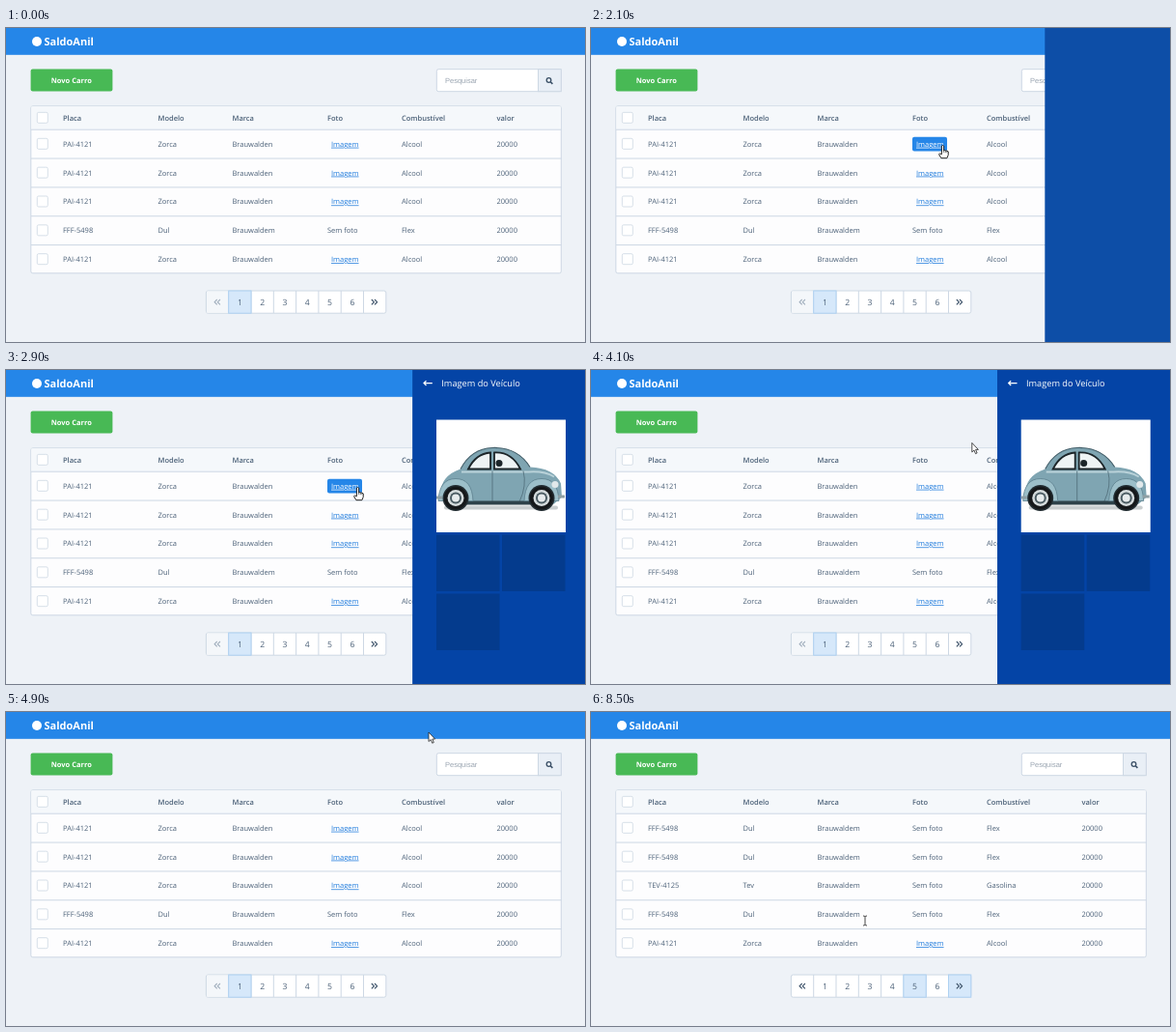
These frames come from a looping animation (600 px wide and 325 px high, 8600 ms). An HTML page:

```html
<!DOCTYPE html>
<html lang="pt-BR">
<head>
<meta charset="utf-8">
<title>Carros</title>
<style>
  html, body { margin: 0; width: 100%; height: 100%; overflow: hidden; background: #eef2f7; }
  svg { display: block; font: 7.5px "Open Sans", sans-serif; text-rendering: geometricPrecision; }
</style>
</head>
<body>
<svg id="stage" width="600" height="325" viewBox="0 0 600 325"></svg>
<script>
const stage = document.getElementById('stage');
const LOOP = 8600, STEP = 100;
const INK = '#4c6178', LINE = '#cdd8e4', BLUE = '#2586e8';

const clamp = v => Math.max(0, Math.min(1, v));
const ramp = (t, from, to) => clamp((t - from) / (to - from));
const smooth = u => u * u * (3 - 2 * u);

const rect = (x, y, w, h, fill, extra = '') =>
  `<rect x="${x}" y="${y}" width="${w}" height="${h}" fill="${fill}" ${extra}/>`;
const text = (x, y, s, fill = INK, extra = '') =>
  `<text x="${x}" y="${y}" fill="${fill}" ${extra}>${s}</text>`;
const path = (d, fill, stroke = 'none', width = 1) =>
  `<path d="${d}" fill="${fill}" stroke="${stroke}" stroke-width="${width}"/>`;
const circle = (x, y, r, fill, extra = '') => `<circle cx="${x}" cy="${y}" r="${r}" fill="${fill}" ${extra}/>`;
const group = (x, y, body) => `<g transform="translate(${x} ${y})">${body}</g>`;

// Table
const columns = [59, 157.5, 234.5, 333, 410, 508.5];
const titles = ['Placa', 'Modelo', 'Marca', 'Foto', 'Combustível', 'valor'];
const cars = {
  P: ['PAI-4121', 'Zorca', 'Brauwalden', '', 'Alcool', '20000'],
  F: ['FFF-5498', 'Dul', 'Brauwaldem', 'Sem foto', 'Flex', '20000'],
  X: ['TEV-4125', 'Tev', 'Brauwaldem', 'Sem foto', 'Gasolina', '20000']
};
const pages = ['PPPFP', 'PXPFX', 'FPXPX', 'FPXXF', 'FFXFP'];
const clicks = [6300, 6800, 7500, 8100];

const checkbox = y => rect(32.3, y - 5.7, 11, 11, '#fff', 'rx="1.5" stroke="#d6dfe8"');
const link = (y, fill) => text(337, y + 2.7, 'Imagem', fill, 'text-decoration="underline"');

function table(page, hover) {
  let s = rect(25.8, 80.8, 549.5, 173, '#fdfdfe', `rx="2" stroke="${LINE}"`)
    + rect(26.3, 81.3, 548.5, 23.7, '#f5f8fb') + checkbox(93);
  titles.forEach((name, i) => s += text(columns[i], 95.7, name, INK, 'font-weight="600"'));
  [...page].forEach((key, r) => {
    const y = 120 + r * 29.85;
    s += rect(26, y - 15.3, 549.5, 1, LINE) + checkbox(y);
    cars[key].forEach((value, i) => s += text(columns[i], y + 2.7, value));
    if (key === 'P') s += link(y, '#1f7bdc');
  });
  if (hover) s += `<g opacity="${hover}">${rect(333, 112.7, 36, 14.8, BLUE, 'rx="2"')}${link(120, '#fff')}</g>`;
  return s;
}

// Page buttons
function chevrons(x, dir, color) {
  const one = dx => `M${x + dx - 1.3 * dir} 281l${2.6 * dir} 2.7l${-2.6 * dir} 2.7`;
  return path(one(-1.6) + one(1.6), 'none', color, 1.15);
}

function pager(t, current) {
  const fade = current ? ramp(t, clicks[current - 1] - 100, clicks[current - 1] + 200) : 1;
  const hover = ramp(t, 5800, 6100), w = 23.3;
  const left = i => 207.4 + i * w;
  let s = rect(207.4, 272, 8 * w, 23.2, '#fff', `rx="2" stroke="${LINE}"`), lit = '';
  if (!current) s += rect(208, 272.5, w - .5, 22.2, '#f4f7fa');
  for (let i = 1; i < 8; i++) s += rect(left(i) - .5, 272, 1, 23, LINE);
  for (let i = 1; i < 8; i++) {
    const on = i === 7 ? hover : i === current + 1 ? fade : i === current ? 1 - fade : 0;
    if (on) lit += rect(left(i), 272, w, 23.2, '#d6e8fa', `stroke="#aed1f2" opacity="${on}"`);
  }
  s += lit;
  for (let i = 1; i < 7; i++)
    s += text(left(i) + w / 2, 286.7, i, INK, 'font-size="8.6" text-anchor="middle"');
  return s + chevrons(219, -1, current ? '#3f546b' : '#a3b0be') + chevrons(381.7, 1, '#3f546b');
}

function screen(t) {
  const current = clicks.filter(c => t >= c).length;
  const hover = ramp(t, 1400, 1700) * (1 - ramp(t, 2900, 3200));
  return rect(0, 0, 600, 325, '#eef2f7') + rect(0, 0, 600, 27.8, BLUE)
    + circle(32, 14, 5, '#fff')
    + text(39.5, 17.6, 'SaldoAnil', '#fff', 'font-size="11" font-weight="700"')
    + rect(25.6, 42.4, 84.8, 23.2, '#48b955', 'rx="2"')
    + text(67.8, 56.7, 'Novo Carro', '#fff', 'font-weight="700" text-anchor="middle"')
    + rect(446.3, 42.7, 129, 23, '#fff', `rx="2" stroke="${LINE}"`)
    + rect(551.5, 42.7, 23.8, 23, '#e9eff6', `stroke="${LINE}"`)
    + text(455, 56.8, 'Pesquisar', '#9aa5b1', 'font-family="Liberation Sans, sans-serif"')
    + circle(562.5, 54, 2.3, 'none', 'stroke="#3a4f66" stroke-width="1.3"')
    + path('M564.2 55.7l2.2 2.2', 'none', '#3a4f66', 1.6)
    + table(pages[current], hover) + pager(t, current);
}

// Side drawer
const wheel = x => circle(x, 81, 12, '#16191b') + circle(x, 81, 8.5, '#d5dcdd')
  + circle(x, 81, 6, '#4a5b62') + circle(x, 81, 4, '#e6ebec');
const fender = x => path(`M${x - 18} 84Q${x - 17} 61 ${x} 61Q${x + 17} 61 ${x + 18} 84Z`, '#9cbfc9', '#5d818e', .8)
  + circle(x, 81, 13.5, '#222d32');

const photo = rect(0, 0, 134, 116.5, '#fff')
  + rect(8, 89, 118, 4, '#c9cecf', 'rx="2"')
  + path('M4 78Q4 58 25 51Q36 30 58 29Q84 28 97 49Q122 50 129 66L130 80L122 87H10Z', '#7fa5b2')
  + path('M25 51Q36 30 58 29Q84 28 97 49', 'none', '#45606b', 1.2)
  + path('M33 51Q41 35 56 34V51ZM60 34Q78 33 87 51H60Z', '#eef3f4', '#1c2529', 1.8)
  + circle(65, 45, 3.5, '#1c2529')
  + path('M26 54H96Q112 53 122 59', 'none', '#b9d2d9', 2)
  + path('M58 53V85M90 53Q94 68 86 85', 'none', '#55737f', .9)
  + rect(30, 84, 68, 4, '#2e424a') + fender(20) + fender(109)
  + rect(0, 79, 6, 3, '#8f9fa4') + rect(126, 78, 7, 3, '#8f9fa4')
  + circle(123, 67, 3.5, '#e1e9eb') + wheel(20) + wheel(109);

const thumb = (x, y) => rect(x, y, 65.5, 58.5, '#043b8d');
const panel = rect(0, 0, 180, 325, '#0444a6')
  + path('M20.3 13.6H11.5M14 11.2L11.5 13.6L14 16', 'none', '#fff', 1.25)
  + text(29.8, 16.8, 'Imagem do Veículo', '#fff', 'font-size="9.2" font-weight="500"')
  + group(24.5, 51.5, photo) + thumb(24.5, 170.5) + thumb(92.5, 170.5) + thumb(24.5, 231.5);

function drawer(t) {
  if (t < 2000 || t >= 4900) return '';
  const closing = t > 4000;
  const slideIn = (start, tau) => 179 * Math.exp(-Math.max(0, t - start) / tau);
  const slideOut = start => 179 * ramp(t, start, start + 500) ** 2;
  const back = 421.2 + (closing ? slideOut(4390) : slideIn(1950, 116));
  const front = 421.2 + (closing ? slideOut(4325) : slideIn(2200, 110));
  return rect(back, 0, 179, 325, closing ? '#053c90' : '#0d4ea7')
    + group(Math.max(front, back), 0, panel);
}

// Pointer
const shapes = {
  arrow: path('M0 0V9.5L2.2 7.6L3.7 11.2L5.3 10.5L3.8 7H6.6Z', '#fff', '#222', .8),
  hand: '<g transform="scale(1.1)">'
    + path('M-1 .5Q0 -.6 1 .5V5L2 4.6L3 5L4 5.1L5.2 5.8V9L4 12H-1.5L-3.6 8.3Q-3 7-1 8.4Z', '#fff', '#222', .9)
    + path('M1 5V7M2.6 5V7M4 5.3V7', 'none', '#222', .5) + '</g>',
  beam: path('M-2 -5Q0 -5 0 -4Q0 -5 2 -5M0 -4V4M-2 5Q0 5 0 4Q0 5 2 5', 'none', '#333', .9)
};

// start, end, shape, from, bend, to
const moves = [
  [600, 1400, 'arrow', [452, 273], [420, 190], [366, 124]],
  [1500, 2900, 'hand', [364.5, 121.5], [364.5, 121.5], [364.5, 121.5]],
  [3000, 3700, 'arrow', [366, 121], [372, 110], [378.5, 100]],
  [4000, 4300, 'arrow', [378.5, 100], [410, 50], [441, 20]],
  [4400, 4700, 'hand', [444.5, 17.5], [444.5, 17.5], [444.5, 17.5]],
  [4800, 4900, 'arrow', [440, 20], [439, 20], [438, 21]],
  [4900, 5800, 'arrow', [438, 21], [179, 150], [387, 282]],
  [5900, 8100, 'hand', [388, 281.5], [388, 281.5], [388, 281.5]],
  [8200, 8300, 'arrow', [382, 276], [365, 265], [345, 252]],
  [8400, 8500, 'beam', [305, 230], [295, 223], [284, 216]]
];

function pointer(t) {
  const move = moves.filter(m => t >= m[0]).pop();
  if (!move) return '';
  const [start, end, shape, a, b, c] = move;
  const u = smooth(ramp(t, start, end)), v = 1 - u;
  const at = i => v * v * a[i] + 2 * u * v * b[i] + u * u * c[i];
  return group(at(0), at(1), shapes[shape]);
}

let shown = -1;
function tick() {
  const t = Math.floor(performance.now() % LOOP / STEP) * STEP;
  if (t !== shown) {
    shown = t;
    stage.innerHTML = screen(t) + drawer(t) + pointer(t);
  }
  requestAnimationFrame(tick);
}
tick();
</script>
</body>
</html>
```
